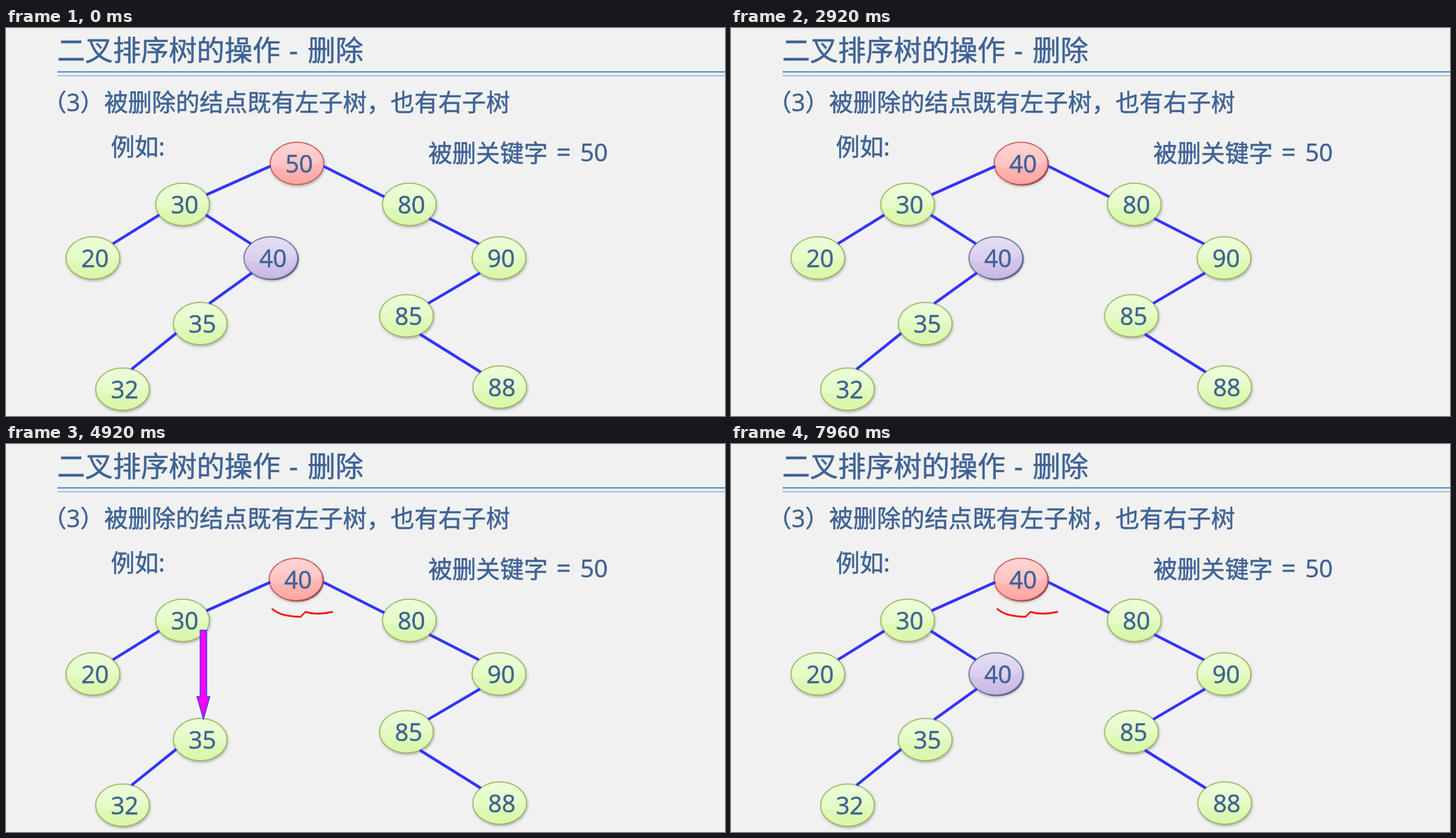
Animation of 1018 by 550 pixels, one loop 8000 ms. Source, as an HTML page with a canvas:

```html
<!DOCTYPE html>
<html lang="zh-CN">
<head>
<meta charset="utf-8">
<style>
html, body { margin: 0; width: 100%; height: 100%; overflow: hidden; background: #f1f1f1; }
canvas { display: block; width: 1018px; height: 550px; }
</style>
</head>
<body>
<canvas id="stage"></canvas>
<script>
const W = 1018, H = 550, RX = 38, RY = 30, LOOP = 8000;
const INK = '#3d6294', EDGE = '#3434fa';
const FONT = '"Open Sans", "Noto Sans CJK SC", "Noto Sans CJK", sans-serif';
const TIMES = { replace: 2120, pen: 3040, remove: 4280, arrow: 4360, restore: 5400 };

const canvas = document.getElementById('stage');
const scale = window.devicePixelRatio || 1;
canvas.width = W * scale;
canvas.height = H * scale;
const ctx = canvas.getContext('2d');

const STYLES = {
  green:  { top: '#eafcd3', bottom: '#d9f7a8', rim: '#9cba64' },
  red:    { top: '#ffcdcd', bottom: '#ffa6a2', rim: '#cb5a56' },
  purple: { top: '#e0d8f0', bottom: '#c9b8e7', rim: '#75719f', depth: '#47789f' }
};

// Nodes in insertion order; `from` and `to` are clock hours at which
// the edge leaves the parent and meets the node.
const node = (key, x, y, from, to) => ({ key, x, y, from, to });
const TREE = [
  node(50, 412, 192),
  node(30, 250, 250, 8.75, 2.1),
  node(80, 571, 250, 3.25, 9.7),
  node(20, 123, 326, 8, 1.6),
  node(40, 375, 326, 4, 10.4),
  node(90, 698, 326, 4.4, 10.4),
  node(35, 275, 419, 7.5, 0.65),
  node(85, 567, 408, 7.5, 1.8),
  node(32, 165, 512, 8.1, 0.65),
  node(88, 699, 509, 5, 10.5)
];
const [root, ...children] = TREE;

function insert(child, at) {
  const side = child.key < at.key ? 'left' : 'right';
  if (at[side]) return insert(child, at[side]);
  at[side] = child;
  child.parent = at;
}
children.forEach(child => insert(child, root));

const progress = (t, start, length) => Math.max(0, Math.min(1, (t - start) / length));

function text(str, x, y, size = 33.8, align = 'left') {
  ctx.font = `${size}px ${FONT}`;
  ctx.textAlign = align;
  ctx.fillStyle = ctx.strokeStyle = INK;
  ctx.lineWidth = 0.5;
  ctx.fillText(str, x, y);
  ctx.strokeText(str, x, y);
}

function rule(y, width, color) {
  ctx.fillStyle = color;
  ctx.fillRect(73, y, W - 73, width);
}

function oval(x, y, rx = RX, ry = RY) {
  ctx.beginPath();
  ctx.ellipse(x, y, rx, ry, 0, 0, Math.PI * 2);
}

function clipped(x, y, w, h, paint) {
  ctx.save();
  ctx.beginPath();
  ctx.rect(x, y, w, h);
  ctx.clip();
  paint();
  ctx.restore();
}

function drawNode({ key, x, y }, kind = 'green', depth = STYLES[kind].depth) {
  const { top, bottom, rim } = STYLES[kind];
  if (depth) {
    oval(x + 1.7, y + 1.5);
    ctx.fillStyle = depth;
    ctx.fill();
  }
  const fill = ctx.createLinearGradient(0, y - RY, 0, y + RY);
  fill.addColorStop(0, top);
  fill.addColorStop(1, bottom);
  ctx.save();
  ctx.shadowColor = 'rgba(70,70,70,.5)';
  ctx.shadowBlur = 4 * scale;
  ctx.shadowOffsetX = scale;
  ctx.shadowOffsetY = 2 * scale;
  oval(x, y);
  ctx.fillStyle = fill;
  ctx.fill();
  ctx.restore();

  // Glossy upper half
  ctx.save();
  ctx.clip();
  oval(x - 8, y - 24, 58, 31);
  ctx.fillStyle = 'rgba(255,255,255,.15)';
  ctx.fill();
  ctx.restore();

  oval(x, y);
  ctx.strokeStyle = rim;
  ctx.lineWidth = 1.5;
  ctx.stroke();
  text(key, x + 3, y + 13, 34.2, 'center');
}

function rimPoint({ x, y }, hour) {
  const a = hour * Math.PI / 6;
  return [x + RX * Math.sin(a), y - RY * Math.cos(a)];
}

function drawEdge(child) {
  ctx.beginPath();
  ctx.moveTo(...rimPoint(child.parent, child.from));
  ctx.lineTo(...rimPoint(child, child.to));
  ctx.strokeStyle = EDGE;
  ctx.lineWidth = 4;
  ctx.stroke();
}

const underline = new Path2D('M377 234 Q386 241 397 243 T417 245 L424 238 Q440 243 462 238');

function drawUnderline(p) {
  clipped(374, 225, 92 * p, 30, () => {
    ctx.strokeStyle = '#f41414';
    ctx.lineWidth = 2.4;
    ctx.lineCap = ctx.lineJoin = 'round';
    ctx.stroke(underline);
  });
}

const arrow = new Path2D('M275 264 h9 v94 h4.5 l-9 32 l-9 -32 h4.5 z');

function drawArrow(p) {
  clipped(265, 262, 30, 130 * p, () => {
    ctx.fillStyle = '#ff00f6';
    ctx.fill(arrow);
    ctx.strokeStyle = '#4a3cf0';
    ctx.lineWidth = 1.5;
    ctx.stroke(arrow);
  });
}

function drawHeadings() {
  text('二叉排序树的操作', 72.5, 46, 39.5);
  text('-', 407, 46, 39.5, 'center');
  text('删除', 427, 46, 39.5);
  rule(61, 2.4, '#6c9acb');
  rule(67, 1.2, '#82abd5');
  text('（3）被删除的结点既有左子树，也有右子树', 52, 117.5);
  text('例如:', 148.5, 181);
  text('被删关键字', 598, 190);
  text('=', 789.5, 189, 36, 'center');
  text('50', 832.5, 189, 34.2, 'center');
}

function draw(t) {
  ctx.setTransform(scale, 0, 0, scale, 0, 0);
  ctx.fillStyle = '#f1f1f1';
  ctx.fillRect(0, 0, W, H);
  drawHeadings();

  const removed = t >= TIMES.remove && t < TIMES.restore;
  const target = root.left.right;
  const visible = children.filter(n => !removed || n !== target);

  if (t < TIMES.replace) drawNode(root, 'red');
  else drawNode({ ...root, key: target.key, x: root.x - 1.5 }, 'red', '#a04848');
  visible.forEach(n => drawNode(n, n === target ? 'purple' : 'green'));
  visible.filter(n => !removed || n.parent !== target).forEach(drawEdge);

  if (removed) drawArrow(progress(t, TIMES.arrow, 400));
  drawUnderline(progress(t, TIMES.pen, 520));
}

function tick() {
  draw(performance.now() % LOOP);
  requestAnimationFrame(tick);
}
tick();
</script>
</body>
</html>
```
